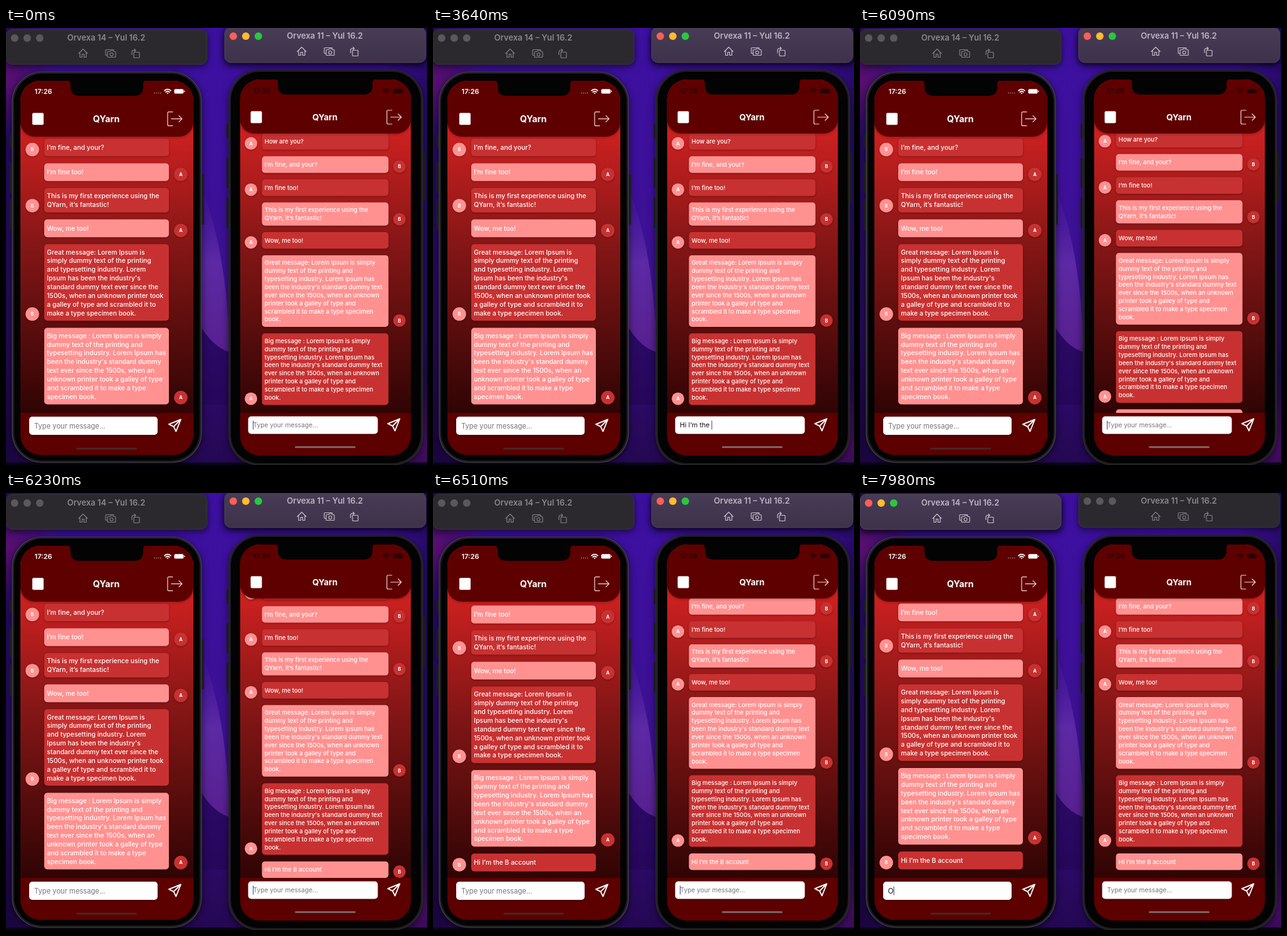
Animation of 672 by 696 pixels, one loop 8 s. Source, as an HTML page:

```html
<!DOCTYPE html>
<html lang="en">
<head>
<meta charset="utf-8">
<title>Two chat simulators</title>
<style>
  html, body { margin: 0; width: 100%; height: 100%; overflow: hidden; background: #160636; }
  svg { display: block; width: 672px; height: 696px; }
  text { font-family: Inter, "Open Sans", sans-serif; }
  .line { fill: none; stroke-linecap: round; stroke-linejoin: round; }
  .soft { filter: drop-shadow(0 1px 1.5px #0005); }
  .head { filter: drop-shadow(0 1px 2px #0005); }
  .window { filter: drop-shadow(0 3px 6px #0009); }
</style>
</head>
<body>
<svg id="stage" viewBox="0 0 672 696"></svg>
<script>
const APP = 'QYarn';
const LOOP = 8000, TICK = 70;
const stage = document.getElementById('stage');
const clamp = v => Math.min(1, Math.max(0, v));
const ease = v => (1 - Math.cos(Math.PI * clamp(v))) / 2;

const rect = (x, y, w, h, r, fill, extra = '') =>
  `<rect x="${x}" y="${y}" width="${w}" height="${h}" rx="${r}" fill="${fill}" ${extra}/>`;
const circle = (x, y, r, fill, extra = '') =>
  `<circle cx="${x}" cy="${y}" r="${r}" fill="${fill}" ${extra}/>`;
// y is the middle of the capitals
const text = (x, y, size, weight, fill, str, extra = '') =>
  `<text x="${x}" y="${y + size * .36}" font-size="${size}" font-weight="${weight}" fill="${fill}" ${extra}>${str}</text>`;
const centred = 'text-anchor="middle"';
const icon = (x, y, d, color, width = 1.2, scale = 1) =>
  `<path class="line" transform="translate(${x} ${y}) scale(${scale})" d="${d}" stroke="${color}" stroke-width="${width}"/>`;

const icons = {
  home: 'M-7 0L0-7L7 0M-5-1.5V6H-1.5V1H1.5V6H5V-1.5',
  camera: 'M-5 3H-7Q-8 3-8 2V-5Q-8-6-7-6H4Q5-6 5-5M-4-3H-1L0-4.5H4L5-3H7Q8-3 8-2V5Q8 6 7 6H-4Q-5 6-5 5V-2Q-5-3-4-3M4 1.5A2.5 2.5 0 1 1-1 1.5A2.5 2.5 0 1 1 4 1.5',
  rotate: 'M-2-2H5Q6-2 6-1V6Q6 7 5 7H-2Q-3 7-3 6V-1Q-3-2-2-2M-6 2V-2Q-6-5-3-5H0M-2-7L0-5L-2-3',
  exit: 'M-3-11H-9Q-11-11-11-9V9Q-11 11-9 11H-3M-5 0H12M7-5L12 0L7 5',
  send: 'M10-10L-10-2L-2 2L2 10ZM10-10L-2 2',
  wifi: 'M-5-1.2Q0-5.6 5-1.2M-2.8 1Q0-1.4 2.8 1M-.5 3H.5'
};

const tail = 'dummy text of the printing and|typesetting industry. Lorem Ipsum has|been the industry\'s standard dummy';
const end = ' text|ever since the 1500s, when an unknown|printer took a galley of type and|scrambled it to make a type specimen|book.';
const chat = (great, big) => [
  ['A', 'How are you?'],
  ['B', 'I’m fine, and your?'],
  ['A', 'I’m fine too!'],
  ['B', `This is my first experience using the|${APP}, it’s fantastic!`],
  ['A', 'Wow, me too!'],
  ['B', 'Great message: Lorem Ipsum is' + great],
  ['A', 'Big message : Lorem Ipsum is simply|' + tail + big],
  ['B', 'Hi I’m the B account']
];

const left = {
  id: 'left', me: 'A', body: [10, 70, 302, 622], screen: [23, 84, 276, 596], edge: '#47464b',
  buttons: [[5.5, 169, 22], [5.5, 214, 49], [5.5, 273, 50], [311, 233, 80]],
  notch: [103, 219, 108], status: [45.5, 101, '#fff'], dots: 237, wifi: 258, battery: 268.5,
  headEnd: 173, title: [160, 144.7, 14.3], logo: 51, exit: 269,
  size: 10.4, leading: 13.86, gap: 11.1, single: 28.4, floor: 599.4, bubble: [61, 199], faces: [42, 279, 10.8],
  input: [37, 619, 205, 29], hint: 11.2, send: [269.5, 633], bar: [112, 670, '#4a2626'],
  rows: chat('|simply dummy text of the printing|and typesetting industry. Lorem|Ipsum has been the industry\'s|standard dummy text ever since the|1500s, when an unknown printer took|a galley of type and scrambled it to|make a type specimen book.',
    '|text ever since the 1500s, when an|unknown printer took a galley of type|and scrambled it to make a type|specimen book.')
};
const right = {
  id: 'right', me: 'B', body: [356, 67, 309, 629], screen: [373.5, 82, 273, 599], edge: '#2e2d31',
  buttons: [[352, 153, 23], [352, 207, 48], [352, 270, 48], [664, 197, 80]],
  notch: [434, 585, 106], status: [394, 100.5, '#2b0000'], dots: 586, wifi: 607, battery: 618,
  headEnd: 168, title: [509, 142, 13.5], logo: 399.5, exit: 619,
  size: 9.58, leading: 12.87, gap: 10.4, single: 26.4, floor: 600.4, bubble: [408.5, 202], faces: [391, 628, 10],
  input: [386.5, 618.5, 207, 28], hint: 10.2, send: [619, 632], bar: [461, 667.5, '#7b6262'],
  rows: chat(' simply|' + tail + end, end)
};

function rowList(p) {
  const [bx, bw] = p.bubble, [otherX, mineX, r] = p.faces;
  let bottom = p.floor, out = '';
  p.rows.slice().reverse().forEach(([who, message], i) => {
    const lines = message.split('|'), mine = who === p.me;
    const h = lines.length > 1 ? lines.length * p.leading + 11.1 : p.single;
    const first = bottom - h / 2 - (lines.length - 1) * p.leading / 2;
    out += `<g ${i ? '' : `id="${p.id}New"`}>` +
      rect(bx, bottom - h, bw, h, 5, mine ? '#ff9191' : '#c83131', 'class="soft"') +
      lines.map((s, n) => text(bx + 4.3, first + n * p.leading, p.size, 500, '#fff', s)).join('') +
      circle(mine ? mineX : otherX, bottom - r, r, mine ? '#c83131' : '#ff9191', 'class="soft"') +
      text(mine ? mineX : otherX, bottom - r, 7.6, 700, '#fff', who, centred) + '</g>';
    bottom -= h + p.gap;
  });
  return out;
}

function phone(p) {
  const [x, y, w, h] = p.screen, [nx1, nx2, ny] = p.notch;
  const [sx, sy, ink] = p.status, [ix, iy, iw, ih] = p.input;
  const [tx, ty, ts] = p.title, [hx, hy, hc] = p.bar, mid = iy + ih / 2;
  return p.buttons.map(([bx, by, bh]) => rect(bx, by, 5, bh, 1.5, '#242228')).join('') +
    rect(...p.body, 48, '#1d1d1f', `stroke="${p.edge}" stroke-width="1.2" class="window"`) +
    rect(p.body[0] + 3, p.body[1] + 3, p.body[2] - 6, p.body[3] - 6, 45, '#030303') +
    `<clipPath id="${p.id}Clip">${rect(x, y, w, h, 32, '#000')}</clipPath><g clip-path="url(#${p.id}Clip)">` +
    rect(x, y, w, h, 0, 'url(#chat)') +
    `<g id="${p.id}Rows">${rowList(p)}</g>` +
    rect(x, 613, w, 90, 0, '#5c0000') +
    rect(x, y - 40, w, p.headEnd - y + 40, 23, '#5e0000', 'class="head"') +
    `<path d="M${nx1 - 5} ${y - 1}Q${nx1} ${y} ${nx1} ${y + 6}V${ny - 14}Q${nx1} ${ny} ${nx1 + 15} ${ny}H${nx2 - 15}Q${nx2} ${ny} ${nx2} ${ny - 14}V${y + 6}Q${nx2} ${y} ${nx2 + 5} ${y - 1}Z" fill="#030303"/>` +
    text(sx, sy, 11, 600, ink, '17:26') +
    [0, 1, 2, 3].map(i => circle(p.dots + i * 3.2, sy + 2.5, .8, ink, 'opacity=".6"')).join('') +
    icon(p.wifi, sy, icons.wifi, ink, 1.7) +
    rect(p.battery, sy - 3.8, 15, 7.4, 2.2, ink) + rect(p.battery + 15.8, sy - 1.4, 1.2, 2.6, .6, ink) +
    rect(p.logo - 9, ty - 9.5, 18, 19, 2, '#fff') +
    text(tx, ty, ts, 700, '#fff', APP, centred) +
    icon(p.exit, ty, icons.exit, '#f3d9d9') +
    rect(ix, iy, iw, ih, 5, '#fff', 'class="soft"') +
    text(ix + 8, mid, p.hint, 400, '#77777b', 'Type your message...', `id="${p.id}Hint"`) +
    text(ix + 7.5, mid, p.hint * 1.05, 400, '#111', '', `id="${p.id}Text"`) +
    rect(ix + 7.5, mid - 7, 1.1, 14, 0, '#4f4389', `id="${p.id}Caret"`) +
    icon(...p.send, icons.send, '#fff', 2, .95) +
    rect(hx, hy - 1.5, 97, 3, 1.5, hc) + '</g>';
}

function toolbar(x, y, label, active) {
  const ink = active ? '#bdb6c3' : '#8b878e', cx = x + 160;
  const lights = active ? ['#ff5f57', '#febc2e', '#28c840'] : Array(3).fill('#5a575d');
  const glyph = active ? '#c6bfcc' : '#807c84';
  return rect(x, y, 321, 56, 10, active ? 'url(#live)' : '#2c292e',
      `stroke="${active ? '#594c64' : '#3b383e'}" stroke-width=".8" class="window"`) +
    lights.map((c, i) => circle(x + 13.8 + i * 20, y + 14, 6, c)).join('') +
    text(cx, y + 13.5, 13, 600, ink, label, centred) +
    icon(cx - 37, y + 38.5, icons.home, glyph) + icon(cx + 7, y + 38.5, icons.camera, glyph) +
    icon(cx + 47, y + 38.5, icons.rotate, glyph);
}
const bars = (id, x, y, label) =>
  toolbar(x, y, label, false) + `<g id="${id}Live">${toolbar(x, y, label, true)}</g>`;

const gradient = (id, stops, dir = 'x2="0" y2="1"') => `<linearGradient id="${id}" ${dir}>` +
  stops.map(([at, c]) => `<stop offset="${at}" stop-color="${c}"/>`).join('') + '</linearGradient>';

stage.innerHTML = '<defs>' +
  gradient('sky', [[0, '#3d10a2'], [.35, '#3c1098'], [.7, '#3c128a'], [.85, '#2c0a66'], [1, '#240852']]) +
  gradient('sides', [[0, '#10042a90'], [.1, '#14043600'], [.9, '#14043600'], [1, '#12053080']], '') +
  gradient('glow', [[0, '#4a1ca000'], [.5, '#6a34ae'], [1, '#642692']]) +
  gradient('live', [[0, '#483c56'], [1, '#3d324a']]) +
  `<radialGradient id="plum"><stop stop-color="#5a1070"/><stop offset="1" stop-color="#5a107000"/></radialGradient>
  <linearGradient id="chat" gradientUnits="userSpaceOnUse" x1="0" x2="0" y1="170" y2="613">
    <stop stop-color="#cb2020"/><stop offset=".4" stop-color="#841616"/><stop offset="1" stop-color="#300404"/></linearGradient>` +
  '</defs>' +
  rect(0, 0, 672, 696, 0, 'url(#sky)') +
  '<path d="M300 230Q352 330 357 516Q325 508 300 455Z" fill="url(#glow)" opacity=".7"/>' +
  '<path d="M300 455Q325 508 357 516V600H300Z" fill="#240758" opacity=".7"/>' +
  rect(0, 0, 672, 696, 0, 'url(#sides)') +
  circle(0, 85, 90, 'url(#plum)') + circle(672, 660, 110, 'url(#plum)', 'opacity=".7"') +
  rect(0, 692, 672, 4, 0, '#0b0418') +
  phone(left) + phone(right) +
  bars('left', 0, 2, 'Orvexa 14 – Yul 16.2') + bars('right', 349, -1, 'Orvexa 11 – Yul 16.2');

const $ = id => document.getElementById(id);

const typing = [
  [0, ''], [1190, 'H'], [1260, 'Hi'], [1400, 'Hi '], [1820, 'Hi i'], [2100, 'Hi I'], [2310, 'Hi I’'],
  [2520, 'Hi I’m'], [2590, 'Hi I’m '], [2870, 'Hi I’m t'], [2940, 'Hi I’m th'], [3080, 'Hi I’m the'],
  [3150, 'Hi I’m the '], [3360, 'Hi I’m the b'], [3640, 'Hi I’m the '], [3850, 'Hi I’m the B'],
  [3990, 'Hi I’m the B '], [4200, 'Hi I’m the B a'], [4410, 'Hi I’m the B ac'], [4550, 'Hi I’m the B acco'],
  [4690, 'Hi I’m the B accou'], [4760, 'Hi I’m the B accoun'], [4900, 'Hi I’m the B account'], [5810, '']
];
const blinks = [[280, 630], [5460, 5810], [6650, 6930]];

function setInput(p, value, caret) {
  const field = $(p.id + 'Text');
  field.textContent = value.replace(/ /g, '\u00a0');
  $(p.id + 'Hint').style.opacity = value ? 0 : 1;
  const width = value ? field.getComputedTextLength() : 0;
  $(p.id + 'Caret').setAttribute('x', p.input[0] + 7.5 + width);
  $(p.id + 'Caret').style.opacity = caret;
}

function scrollRows(p, t, start, length) {
  const offset = (p.single + p.gap) * (1 - ease((t - start) / length));
  $(p.id + 'Rows').setAttribute('transform', `translate(0 ${offset})`);
  $(p.id + 'New').style.display = t > start ? '' : 'none';
}

const begin = performance.now();
function draw() {
  const t = Math.floor((performance.now() - begin) % LOOP / TICK) * TICK;
  const blink = blinks.find(([from, to]) => t >= from && t < to);
  const caret = t >= 7700 ? 0 : blink ? 1 - clamp((t - blink[0] + 40) / 180) : 1;
  setInput(right, typing.findLast(([at]) => t >= at)[1], caret);
  setInput(left, t >= 7980 ? 'O' : '', t >= 7700 ? 1 : 0);
  scrollRows(right, t, 6020, 350);
  scrollRows(left, t, 6250, 320);
  const focus = clamp((t - 6860) / 280);
  $('leftLive').style.opacity = focus;
  $('rightLive').style.opacity = 1 - focus;
  requestAnimationFrame(draw);
}
draw();
</script>
</body>
</html>
```
